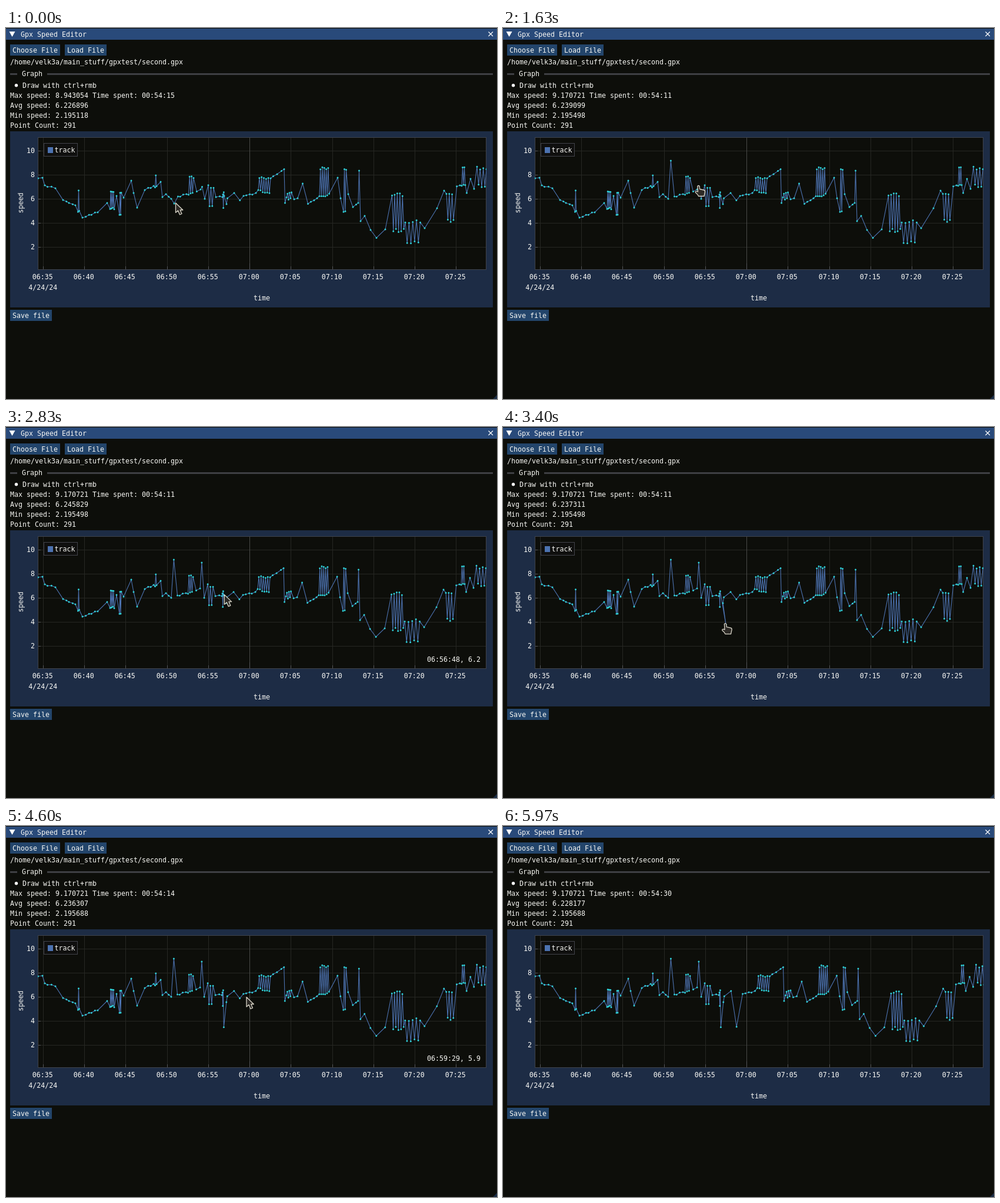
These frames come from a looping animation (835x632 px, 6430 ms). An HTML page:

```html
<!DOCTYPE html>
<html lang="en">
<head>
<meta charset="utf-8">
<title>Gpx Speed Editor</title>
<style>
  html, body { margin: 0; width: 100%; height: 100%; overflow: hidden; background: #0d0e0a; }
  svg { display: block; }
  text { font: 11.63px "DejaVu Sans Mono", "Liberation Mono", monospace; fill: #f8f8f4; white-space: pre; }
  .mid { text-anchor: middle; }
  .end { text-anchor: end; }
  .button { fill: #23456b; }
  .grid { stroke: #262723; }
  .hour { stroke: #4a4b48; }
  .tick { stroke: #55565a; }
  .cursor { fill: #2d2a26; stroke: #d9d5c8; stroke-width: 1.3; stroke-linejoin: round; }
</style>
</head>
<body>
<svg width="835" height="632" viewBox="0 0 835 632">
  <defs><clipPath id="clip"><rect x="54" y="187" width="763" height="224"/></clipPath></defs>
  <rect width="835" height="632" fill="#0d0e0a"/>
  <rect y="1" width="835" height="19" fill="#294a7a"/>
  <path d="M835 625V632H828Z" fill="#1a2c45"/>
  <path d="M5.5 6H15.5L10.5 15Z" fill="#fff"/>
  <path d="M820.5 6.5l7.5 7.5m0-7.5l-7.5 7.5" stroke="#fff" stroke-width="1.2"/>
  <text x="25" y="15">Gpx Speed Editor</text>

  <rect class="button" x="7" y="28" width="85" height="19"/>
  <text x="11" y="42">Choose File</text>
  <rect class="button" x="100" y="28" width="71" height="19"/>
  <text x="104" y="42">Load File</text>
  <text x="7" y="62">/home/velk3a/main_stuff/gpxtest/second.gpx</text>
  <path d="M7 78.5H19M70 78.5H828" stroke="#3e3f43" stroke-width="3"/>
  <text x="27" y="82">Graph</text>
  <circle cx="17.5" cy="97.7" r="2.7" fill="#fff"/>
  <text x="28" y="102">Draw with ctrl+rmb</text>
  <text x="7" y="119" id="max"></text>
  <text x="7" y="136" id="avg"></text>
  <text x="7" y="153" id="min"></text>
  <text x="7" y="170">Point Count: 291</text>

  <rect x="7" y="176" width="821" height="300" fill="#1d2c45"/>
  <rect x="54" y="186" width="763" height="226" fill="#0d0e0a"/>
  <g id="axes"></g>
  <rect x="54.5" y="186.5" width="762" height="225" fill="none" stroke="#3f434c"/>
  <text class="mid" x="62.7" y="446">4/24/24</text>
  <text class="mid" x="435" y="464">time</text>
  <text class="mid" transform="translate(28.5 298) rotate(-90)">speed</text>
  <g clip-path="url(#clip)" fill="none">
    <path id="line" stroke="#4c72b0" stroke-width="1.1"/>
    <path id="dots" stroke="#2fd0d8" stroke-width="3" stroke-linecap="round"/>
  </g>
  <rect x="64.5" y="196.5" width="57" height="22" fill="#0f0f0e" stroke="#42434a"/>
  <rect x="71" y="203" width="9" height="10" fill="#4c72b0"/>
  <text x="82.5" y="212">track</text>
  <text class="end" x="807" y="400" id="hover"></text>

  <rect class="button" x="7" y="480" width="71" height="19"/>
  <text x="11" y="494">Save file</text>

  <path id="arrow" class="cursor" d="M0 0V16.5L4 13L7 20L10.5 18.5L7.7 12H12.3Z"/>
  <path id="hand" class="cursor" d="M-1.7 1Q0 -1 1.7 1L2.2 6L9 7.5Q11.5 8 11 11L9.5 18H0Q-1 15 -5 12Q-6 9.5 -3 9.7L-1 10.5Z"/>
</svg>
<script>
const LOOP = 6430, FPS = 0.03;
const PX_PER_SEC = 70.27 / 300, PX_PER_UNIT = 20.5;
const $ = id => document.getElementById(id);
const mix = (a, b, p) => a + (b - a) * p;
const easeOut = p => 1 - (1 - p) ** 3;
const two = n => String(n | 0).padStart(2, "0");

let seed = 7;
function random() {
  seed = seed * 16807 % 2147483647;
  return seed / 2147483647;
}

// Turning points of the calm curve: x, y
const knots = [
  [54.5, 256], [62, 255], [66, 268], [84, 273], [97, 293], [118, 302], [130, 323], [156, 314],
  [172, 298], [188, 286], [200, 289], [213, 260], [217, 281], [223, 306], [236, 276], [251, 269],
  [263, 262], [266, 288], [272, 283], [281, 291], [307, 283], [331, 275], [338, 291], [357, 288],
  [368, 288], [375, 300], [376.5, 290], [388, 281], [404, 286], [425, 281], [450, 256], [473, 240.5],
  [474.5, 298], [496, 290], [504.5, 265], [513.5, 299.5], [529, 290], [564, 255], [569, 290],
  [582, 283], [590, 305], [599, 298], [600.5, 243], [603, 329], [610, 320], [620, 344],
  [630, 357.5], [645, 343], [712, 341], [733, 307], [745, 277], [772, 268], [783.5, 281],
  [790, 257], [796, 274]
];
// Bursts that swing between two levels: x0, x1, count, first level, second level
const bursts = [
  [122.5, 124.5, 3, 312, 274], [177, 184, 7, 307, 280], [193, 196, 4, 316, 283],
  [253.5, 256, 3, 272, 253], [310.5, 319, 6, 281, 255], [344, 353, 5, 270, 301],
  [369, 370.3, 3, 281, 305], [429, 448, 11, 279, 257], [477, 485.5, 6, 290, 283],
  [533, 549.5, 11, 284, 240], [574, 578.5, 4, 315, 240], [656.5, 676.5, 10, 284, 345],
  [679, 704.5, 9, 329, 364], [749, 761, 6, 283, 328], [775, 781, 5, 268, 236],
  [801, 817, 7, 238, 268]
];
// Each edit: pointer arrives, grabs, reaches the new place, lets go
const edits = [
  { at: 26, grab: 700, drop: 1025, off: 1160, from: [286, 298.9], to: [291.5, 226.1], avg: 6.239099, min: 2.195498, spent: 11 },
  { at: 1625, grab: 1940, drop: 2300, off: 2360, from: [333.5, 270.5], to: [339.5, 231], avg: 6.245829, min: 2.195498, spent: 11 },
  { at: 2925, grab: 3200, drop: 3423.57, off: 3550, from: [371, 285.9], to: [380, 342.7], avg: 6.236307, min: 2.195688, spent: 14 },
  { at: 4826, grab: 5170, drop: 5325, off: 5360, from: [397.8, 293.5], to: [400, 342], avg: 6.228177, min: 2.195688, spent: 30 }
];
const first = { avg: 6.226896, max: 8.943054, min: 2.195118, spent: 15 };
const topSpeed = [9.165986, 9.170721];

const moves = [
  [0, 288, 298], [4130, 408.5, 291.5], [4610, 408.5, 291.5],
  [5730, 237, 92], [5860, 237, 92], [5867, 222, 75], [LOOP, 222, 75],
  ...edits.flatMap(e => [[e.at, ...e.from], [e.grab, ...e.from], [e.drop, ...e.to], [e.off + 20, ...e.to]])
].sort((a, b) => a[0] - b[0]);

function buildTrack() {
  const track = edits.map(edit => ({ x: edit.from[0], y: edit.from[1], edit }));
  const add = (x, y) => track.push({ x, y });
  const busy = x => bursts.some(b => x > b[0] - 2 && x < b[1] + 2) || edits.some(e => Math.abs(x - e.from[0]) < 3);
  knots.forEach(([x, y], i) => {
    add(x, y);
    const [nx, ny] = knots[i + 1] || [x, y];
    const n = Math.abs(ny - y) < nx - x ? Math.round((nx - x) / 5.5) : 1;
    const sparse = nx - x > 30 || (x > 376 && x < 404) || (x > 600 && x < 712);
    for (let k = 1; k < n && !sparse; k++) {
      const p = (k + (random() - 0.5) * 0.5) / n, px = mix(x, nx, p);
      if (!busy(px)) add(px, mix(y, ny, p) + (random() - 0.5) * 3);
    }
  });
  for (const [x0, x1, n, a, b] of bursts)
    for (let i = 0; i < n; i++)
      add(mix(x0, x1, i / (n - 1)), mix(a, b, i % 2) + (random() - 0.5) * 6);
  return track.sort((a, b) => a.x - b.x);
}

function buildAxes() {
  let out = "";
  const seg = (cls, d) => out += `<path class="${cls}" d="${d}"/>`;
  for (let v = 2; v <= 10; v += 2) {
    const y = Math.floor(414.5 - PX_PER_UNIT * v);
    seg("grid", `M55 ${y + .5}H816`);
    seg("tick", `M54 ${y + .5}h5`);
    out += `<text class="end" x="49" y="${y + 4}">${v}</text>`;
  }
  for (let i = 0; i <= 10; i++) {
    const x = Math.floor(63.3 + 70.27 * i) + .5, min = 35 + 5 * i;
    seg(min === 60 ? "hour" : "grid", `M${x} 187V411`);
    seg("tick", `M${x} 411v${min === 60 ? -10 : -5}`);
    out += `<text class="mid" x="${x - 1.2}" y="428">${two(6 + min / 60)}:${two(min % 60)}</text>`;
  }
  $("axes").innerHTML = out;
}

function pointer(t) {
  const i = moves.findIndex(m => m[0] > t);
  const [a, b] = [moves[i - 1], moves[i]];
  const p = (t - a[0]) / (b[0] - a[0]);
  const q = edits.some(e => e.grab === a[0]) ? p : easeOut(p);
  return [mix(a[1], b[1], q), mix(a[2], b[2], q)];
}

function drawTrack(t, x, y) {
  let shift = 0, spent = first.spent, line = "", dots = "";
  for (const { x: px, y: py, edit } of track) {
    let place = [px + shift, py];
    if (edit && t >= edit.off) {
      place = [edit.from[0] - 0.6, edit.to[1]];
      shift += (edit.spent - spent) * PX_PER_SEC;
      spent = edit.spent;
    } else if (edit && t >= edit.grab) place = [x, y];
    const at = place.map(n => n.toFixed(2)).join(" ");
    line += (line ? "L" : "M") + at;
    dots += `M${at}h0`;
  }
  $("line").setAttribute("d", line);
  $("dots").setAttribute("d", dots);
}

function drawStats(t, y) {
  let { avg, max, min, spent } = first;
  for (const e of edits) {
    if (t < e.grab) break;
    const p = t >= e.off ? 1 : (y - e.from[1]) / (e.to[1] - e.from[1]);
    avg = mix(avg, e.avg, p);
    max = Math.max(max, topSpeed[0] + (p - 1) * (e.from[1] - e.to[1]) / PX_PER_UNIT * (e === edits[0]));
    if (t >= e.off) ({ min, spent } = e);
  }
  if (t >= edits[0].off) max = topSpeed[1];
  $("max").textContent = `Max speed: ${max.toFixed(6)} Time spent: 00:54:${spent}`;
  $("avg").textContent = `Avg speed: ${avg.toFixed(6)}`;
  $("min").textContent = `Min speed: ${min.toFixed(6)}`;
}

function hoverText(x, y) {
  const sec = Math.floor(7 * 3600 + (x - 415.7) / PX_PER_SEC);
  return `${two(sec / 3600)}:${two(sec / 60 % 60)}:${two(sec % 60)}, ${((413.4 - y) / PX_PER_UNIT).toFixed(1)}`;
}

function draw(t) {
  const [x, y] = pointer(t);
  const hand = edits.some(e => t >= e.at && t < e.off);
  const justLet = t < 26 || edits.some(e => t >= e.off && t < e.off + 35);
  drawTrack(t, x, y);
  drawStats(t, y);
  $("hover").textContent = !hand && !justLet && y > 187 && y < 411 ? hoverText(x, y) : "";
  $("arrow").style.display = hand || t >= 5960 ? "none" : "";
  $("hand").style.display = hand ? "" : "none";
  $("arrow").setAttribute("transform", `translate(${x + .5} ${y})`);
  $("hand").setAttribute("transform", `translate(${x - 1} ${y - 2})`);
}

buildAxes();
const track = buildTrack();
const start = performance.now();
function tick() {
  const t = (performance.now() - start) % LOOP;
  draw(Math.floor(t * FPS + 0.15) / FPS);
  requestAnimationFrame(tick);
}
tick();
</script>
</body>
</html>
```
